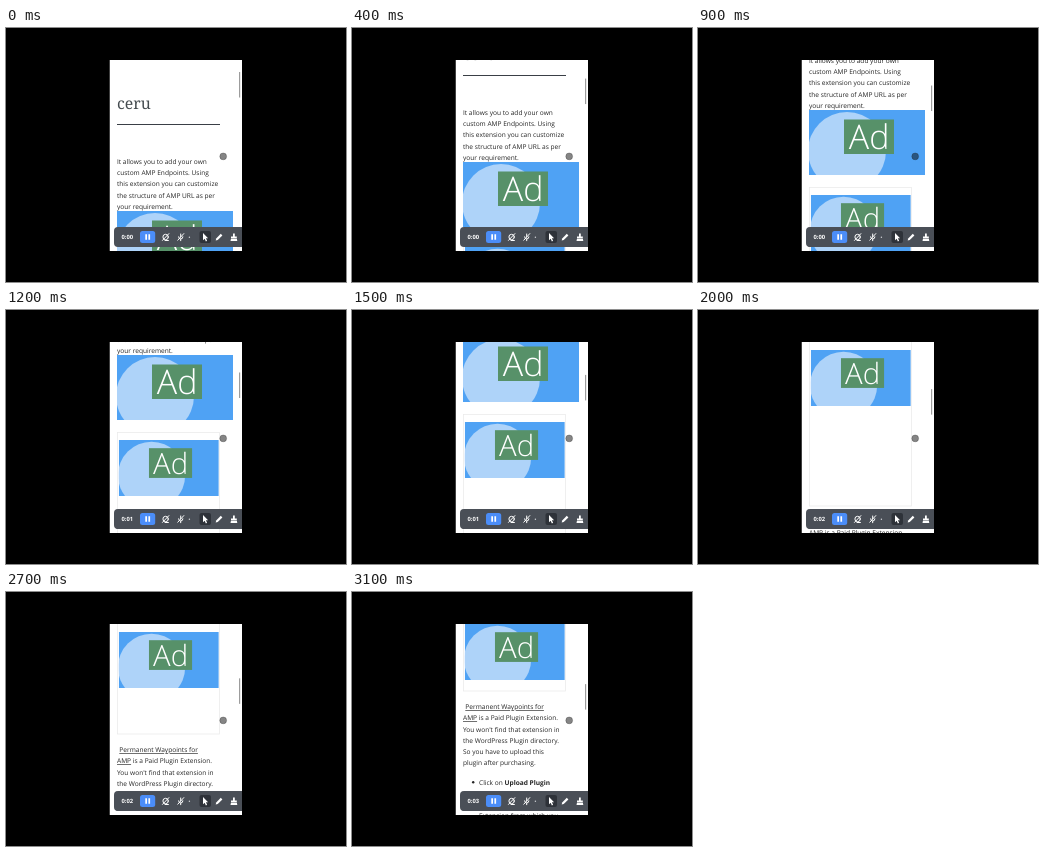
These frames come from a looping animation (340x254 px, 3.3 s). An HTML page:

```html
<!DOCTYPE html>
<html lang="en">
<head>
<meta charset="utf-8">
<title>Scrolling page recording</title>
<style>
  html, body { margin: 0; width: 100%; height: 100%; overflow: hidden; background: #000; }
  svg { display: block; width: 100%; height: 100%; }
  text { font-family: "Open Sans", "Noto Sans", sans-serif; text-rendering: geometricPrecision; white-space: pre; }
  .body { font-size: 6.58px; fill: #262626; }
  .title { font: 300 15.8px "Noto Serif", "Liberation Serif", serif; fill: #454c50; }
  .ad { font-size: 34px; font-weight: 300; fill: #fff; }
  .clock { font-size: 5.8px; font-weight: 700; fill: #fff; }
  .link { text-decoration: underline; }
  .bold { font-weight: 700; }
  .icon { fill: none; stroke: #fff; stroke-width: 1; stroke-linecap: round; stroke-linejoin: round; }
</style>
</head>
<body>
<svg viewBox="0 0 340 254">
  <defs>
    <clipPath id="view"><rect x="103.5" y="32" width="132.5" height="191"/></clipPath>
    <clipPath id="banner"><rect width="116" height="65"/></clipPath>
    <g id="promo" clip-path="url(#banner)">
      <rect width="116" height="65" fill="#4fa2f4"/>
      <circle cx="38" cy="41" r="39" fill="#aed3f9"/>
      <rect x="35" y="9.5" width="50" height="34.5" fill="#579169"/>
      <text class="ad" x="39.8" y="39.3">Ad</text>
    </g>
  </defs>

  <g clip-path="url(#view)">
    <rect x="103.5" y="32" width="132.5" height="191" fill="#fff"/>
    <g id="page">
      <text class="title" x="111" y="80.5">ceru</text>
      <rect x="111" y="96" width="103" height="1" fill="#3a3f46"/>
      <g id="intro" class="body"></g>
      <use href="#promo" x="111" y="183"/>
      <rect x="111.5" y="260.5" width="102" height="197.5" fill="none" stroke="#ebebeb" stroke-width=".8"/>
      <g id="sticky"><use href="#promo" transform="scale(.862)"/></g>
      <g class="body">
        <text class="link" x="113.3" y="476">Permanent Waypoints for</text>
        <text x="111" y="487.25"><tspan class="link">AMP</tspan> is a Paid Plugin Extension.</text>
        <g id="details"></g>
        <circle cx="121.2" cy="549.3" r="1.2"/>
        <text x="127" y="551.7">Click on <tspan class="bold">Upload Plugin</tspan></text>
        <g id="steps"></g>
      </g>
    </g>
    <rect id="thumb" x="233" y="44" width="1.2" height="25.5" fill="#9c9c9c"/>
    <circle cx="217.2" cy="128.4" r="3.4" fill="#000" fill-opacity=".48" stroke="#222" stroke-opacity=".4" stroke-width=".7"/>

    <path d="M236 199H112a4 4 0 0 0-4 4v12a4 4 0 0 0 4 4h124z" fill="#4a4f57"/>
    <text id="clock" class="clock" x="115.5" y="211.2">0:00</text>
    <rect x="134" y="203" width="15.2" height="12" rx="2.5" fill="#4b8df8"/>
    <path d="M139.3 206.3h1.7v5.4h-1.7zM142.4 206.3h1.7v5.4h-1.7z" fill="#fff"/>
    <g class="icon">
      <circle cx="159.6" cy="209" r="2.7"/>
      <path d="M156.5 212.4l6.4-6.8M159 212.5h3.4"/>
      <path d="M174.7 206v2.8M172.6 208.8a2.1 2.1 0 0 0 4.3 0M174.7 211.2v1.5M171.8 212.2l6-6.6"/>
    </g>
    <circle cx="183.4" cy="209.3" r=".7" fill="#cfd2d6"/>
    <rect x="193.5" y="203" width="11.5" height="12" rx="2" fill="#2e3239"/>
    <path d="M197 205v7.3l1.7-1.5 1.2 2.6 1.2-.6-1.2-2.5h2.2z" fill="#fff"/>
    <path d="M209.7 212.5l.5-2 4.6-4.7 1.6 1.6-4.7 4.6z" fill="#fff"/>
    <path d="M227 205.5h1.8v3h2v1.5h-5.8v-1.5h2zM225 210.6h5.8l.5 2.4h-6.8z" fill="#fff"/>
  </g>
</svg>
<script>
  const LOOP = 3300, STEP = 100, LINE = 11.25;
  // Scroll offset at each step: wheel notches with a fast start and a soft stop.
  const scroll = [
    0, 28, 47, 48.5, 49, 49.5, 53, 85.5, 98, 101, 102.5, 108, 138, 150, 154, 156,
    156, 156, 170, 235, 262, 262.5, 262.8, 263, 268, 298, 312, 316, 316.3, 320, 347, 359
  ];
  const $ = id => document.getElementById(id);

  function addLines(id, x, y, lines) {
    lines.forEach((line, i) => {
      const text = document.createElementNS("http://www.w3.org/2000/svg", "text");
      text.setAttribute("x", x);
      text.setAttribute("y", y + i * LINE);
      text.textContent = line;
      $(id).append(text);
    });
  }

  addLines("intro", 111, 135.8, [
    "It allows you to add your own",
    "custom AMP Endpoints. Using",
    "this extension you can customize",
    "the structure of AMP URL as per",
    "your requirement."
  ]);
  addLines("details", 111, 498.5, [
    "You won't find that extension in",
    "the WordPress Plugin directory.",
    "So you have to upload this",
    "plugin after purchasing."
  ]);
  addLines("steps", 127, 562.95, [
    "button and select the",
    "zip file and install the",
    "Extension from which you"
  ]);

  function draw(now) {
    const t = now % LOOP;
    const top = scroll[Math.min(Math.floor(t / STEP), scroll.length - 1)];
    // The second banner sticks below the top edge until its box runs out.
    const stickyY = Math.min(Math.max(268, 40 + top), 391);
    $("page").setAttribute("transform", `translate(0 ${-top})`);
    $("sticky").setAttribute("transform", `translate(112.8 ${stickyY})`);
    $("thumb").setAttribute("y", 44 + top * 0.134);
    $("clock").textContent = "0:0" + Math.floor(t / 1000);
  }

  function tick() {
    draw(performance.now());
    requestAnimationFrame(tick);
  }
  tick();
</script>
</body>
</html>
```
